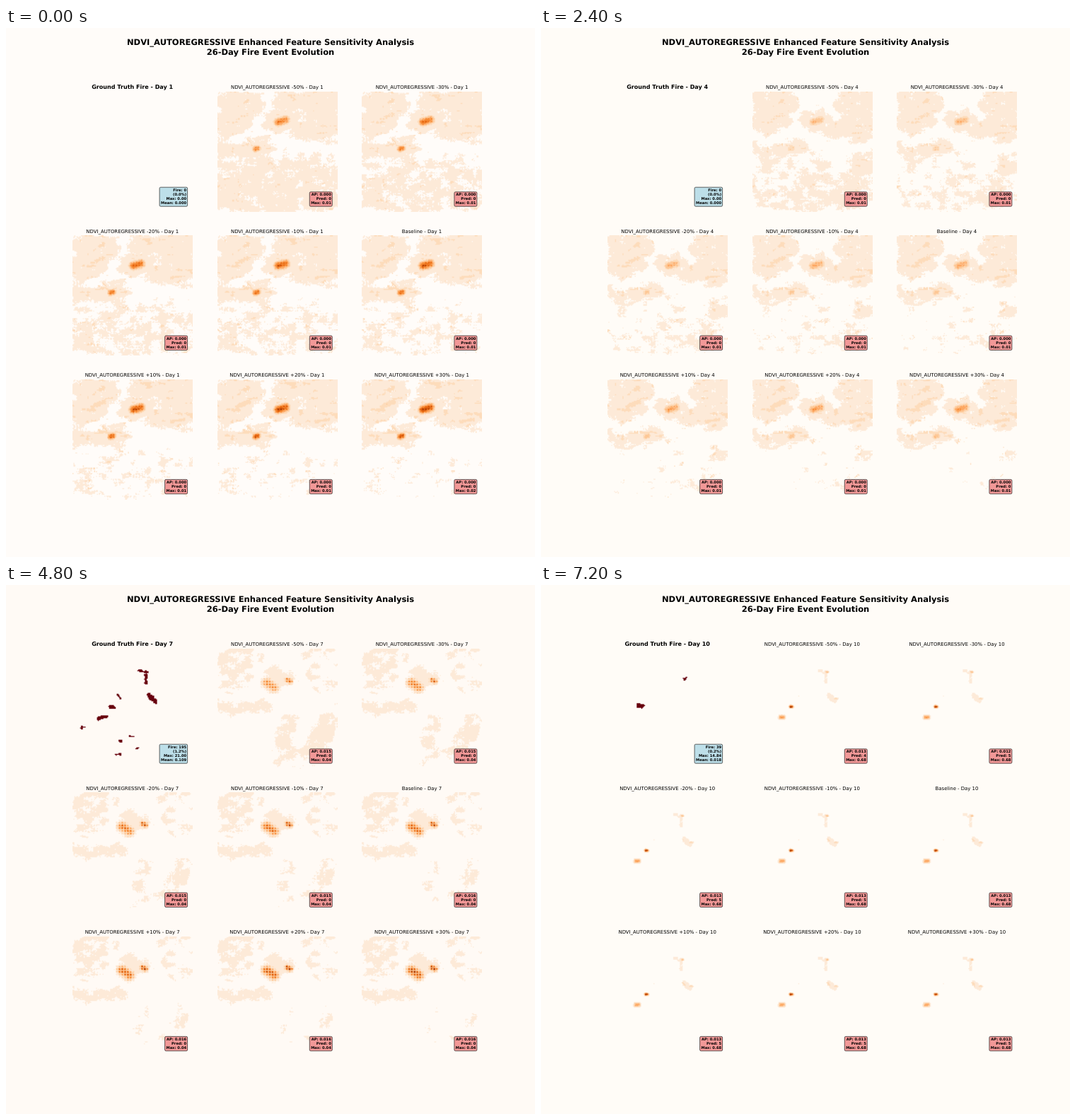
Recreate the animation shown at these times as an HTML page with a canvas. Size 748 by 748 pixels, loop 8 s.

```html
<!DOCTYPE html>
<html lang="en">
<head>
<meta charset="utf-8">
<title>Feature sensitivity</title>
<style>
html, body { margin: 0; width: 100%; height: 100%; overflow: hidden; background: #fffcf7; }
canvas, svg { position: absolute; left: 0; top: 0; width: 100%; height: 100%; display: block; }
text { font-family: "DejaVu Sans", sans-serif; fill: #000; text-rendering: geometricPrecision; }
.b { font-weight: bold; }
</style>
</head>
<body>
<canvas id="maps" width="748" height="748"></canvas>
<svg id="ui" viewBox="0 0 748 748"></svg>
<script>
const N = 128, SIZE = 170, STEP = 800, DAYS = 10;
const LEFT = 94, TOP = 90, DX = 204.65, DY = 203.3;
const SHIFTS = [-50, -30, -20, -10, 0, 10, 20, 30];
const COLORS = ['#fdead8', '#fddcbb', '#fdc795', '#fda863', '#f68932', '#e4640f', '#b13f03'];
const FIRE = '#67000d';

// Every shape is a capsule: x1, y1, x2, y2, radius, in panel units
const LAND = {
  nw: [[16, 16, 46, 14, 18], [14, 44, 34, 38, 17]],
  ne: [[138, 16, 156, 14, 20], [146, 36, 152, 46, 22]],
  crown: [[82, 40, 100, 42, 13]],
  link: [[90, 12, 118, 16, 13]],
  saddle: [[112, 52, 140, 54, 11]],
  ridge: [[36, 82, 66, 80, 9], [6, 82, 20, 84, 8]],
  spur: [[80, 86, 100, 82, 7]],
  plain: [[30, 132, 140, 132, 38]],
  column: [[100, 108, 98, 154, 9]],
  valley: [[162, 102, 126, 150, 11]]
};
const FADING = ['plain', 'column', 'valley'];
const HEAT = {
  core: [86, 43, 97, 40, 6.5], west: [54, 81, 57, 80, 5], nw: [28, 40, 44, 32, 7], ne: [140, 60, 158, 57, 4.5],
  cluster: [70, 48, 80, 55, 8], east: [99, 44, 103, 46, 4.5]
};
// Shoreline growth of each area, and strength of each hot spot
const weather = {
  1: { land: { nw: 3, ne: 4, crown: 4, link: 2, saddle: 2, ridge: 5, plain: -7, valley: -8 }, heat: { core: .82, west: .8, nw: .3, ne: .28 } },
  3: { land: { nw: 1, ne: 2, crown: 2, saddle: 4, ridge: 4, spur: 3, plain: -12, valley: -4 }, heat: { core: .62, west: .52, nw: .27, ne: .3 } },
  5: { land: { nw: 1, ne: 1, crown: 0, saddle: 0, ridge: 2, column: -3, valley: -2 }, heat: { core: .48, west: .38, nw: .34, ne: .27 } },
  6: { land: { nw: 1, ne: 2, link: 2, crown: 0, saddle: 5, ridge: 1, spur: 1, plain: -12, column: -2, valley: -2 }, heat: { core: .36, nw: .4, ne: .38 } },
  7: { land: { nw: -4, ne: -6, crown: -1, ridge: -2, column: -7, valley: -7 }, heat: { cluster: .6, east: .75 } }
};

const EMBERS = [
  [92, 31, 107, 33, 1.8], [104, 37, 104, 49, 1.8], [108, 66, 117, 74, 3], [53, 83, 57, 83, 2.4], [37, 99, 49, 96, 2.3], [64, 65, 68, 70, .9],
  [13, 112, 18, 111, 1.5], [81, 124, 86, 124, 1.5], [66, 131, 70, 131, 1.1], [89, 142, 93, 141, 1.4], [62, 150, 67, 149, 1.4]
];
const FRONTS = [
  [83, 27, 101, 34], [102, 36, 104, 50], [105, 52, 113, 75], [96, 80, 106, 84], [12, 109, 22, 107], [30, 108, 48, 100],
  [50, 98, 57, 85], [58, 94, 80, 82], [48, 142, 66, 141], [66, 140, 88, 125], [72, 156, 80, 156], [88, 143, 96, 143]
].map(c => [...c, 2.2]);
const grow = (list, by) => list.map(([a, b, c, d, r]) => [a, b, c, d, r + by]);
const STREAKS = [[92, 92, 78, 114, 9], [96, 124, 76, 150, 9]];
const fires = {
  5: { solid: [[93, 40, 93, 78, 9.5], [84, 31, 100, 34, 3], [19, 109, 26, 107, 2.4]], loose: [[74, 42, 72, 68, 7], [105, 48, 111, 80, 2], [106, 98, 108, 122, 1]], streaks: STREAKS },
  6: { solid: grow(EMBERS, .8), loose: FRONTS },
  7: { solid: EMBERS },
  8: { solid: grow(EMBERS.slice(0, 6), -1) },
  9: { solid: [[45, 81, 51, 81, 2], [107, 42, 110, 42, 1.5]] },
  10: { solid: [[44, 80, 49, 81, 3.2], [108, 42, 110, 43, 2]] }
};

const nth = (s, i) => {
  const a = s.split(' ');
  return a[Math.min(i, a.length - 1)];
};
const quiet = { fire: '0 0.0 0.00 0.000', ap: '0.000', pred: '0', max: '0.01' };
const stats = {
  1: { ...quiet, max: '0.01 0.01 0.01 0.01 0.01 0.01 0.01 0.02' },
  5: { ...quiet, fire: '1348 8.2 20.00 1.024', ap: '0.012 0.012 0.012 0.012 0.012 0.013' },
  6: { ...quiet, fire: '766 4.7 20.00 0.428', ap: '0.015 0.016' },
  7: { ...quiet, fire: '195 1.2 21.00 0.109', ap: '0.015 0.015 0.015 0.015 0.016', max: '0.04' },
  8: { ...quiet, fire: '37 0.2 21.00 0.017', ap: '0.014', max: '0.20 0.18 0.17 0.17 0.16 0.15 0.15 0.14' },
  9: { fire: '21 0.1 15.00 0.010', ap: '0.013', pred: '0', max: '0.35' },
  10: { fire: '39 0.2 14.84 0.018', ap: '0.013 0.012 0.013', pred: '4 5', max: '0.68' }
};
const ground = day => day === 7 ? '#fffaf5' : day < 3 ? '#fffcf9' : '#fffcf7';

function hash(x, y, k) {
  let h = Math.imul(x, 374761393) + Math.imul(y, 668265263) + Math.imul(k, 974711) | 0;
  h = Math.imul(h ^ h >>> 13, 1274126177);
  return ((h ^ h >>> 16) >>> 0) / 4294967296;
}
const mix = (a, b, t) => a + (b - a) * t;
const ease = t => t * t * (3 - 2 * t);
function smooth(x, y, k) {
  const i = Math.floor(x), j = Math.floor(y), u = ease(x - i), v = ease(y - j);
  return mix(mix(hash(i, j, k), hash(i + 1, j, k), u), mix(hash(i, j + 1, k), hash(i + 1, j + 1, k), u), v);
}
const field = f => Float32Array.from({ length: N * N }, (_, i) => f(i % N, i / N | 0, i));
const unit = v => (v + .5) * SIZE / N;
const ragged = k => field((x, y) => .55 * smooth(x / 8, y / 6, k) + .3 * smooth(x / 3, y / 2, k + 20)
  + .15 * hash(x, y, k + 40) - .5 + (x % 3 && y % 3 ? .03 : -.04));
const rough = ragged(1);
const specks = field((x, y) => .7 * smooth(x / 8, y / 4, 7) + .3 * smooth(x / 2, y / 1.5, 8));

function dist(x, y, [x1, y1, x2, y2]) {
  const dx = x2 - x1, dy = y2 - y1;
  const t = Math.max(0, Math.min(1, ((x - x1) * dx + (y - y1) * dy) / (dx * dx + dy * dy || 1)));
  return Math.hypot(x - x1 - t * dx, y - y1 - t * dy);
}
const depth = (x, y, list = []) => list.reduce((m, c) => Math.max(m, c[4] - dist(x, y, c)), -99);
const depths = {};
for (const k in LAND) depths[k] = field((x, y) => Math.min(5, depth(unit(x), unit(y), LAND[k])));

const heat = (spots, grid) => field((x, y) => {
  const h = spots.reduce((m, c) => Math.max(m, c[5] * Math.exp(-((dist(unit(x), unit(y), c) / c[4]) ** 2))), 0);
  return h * (x % 3 && y % 3 ? 1 + grid : 1 - grid);
});

function burn({ solid, loose, streaks }) {
  return field((x, y) => {
    const px = unit(x), py = unit(y), n = smooth(x / 3, y / 2, 11) - .5;
    const stripe = Math.sin((.57 * px + .82 * py) * .7) > .1;
    return +(depth(px, py, solid) + n * 3 > 0 || depth(px, py, loose) + n * 14 > 0
      || stripe && depth(px, py, streaks) + n * 16 > 0);
  });
}
const burnt = {};
for (const d in fires) burnt[d] = burn(fires[d]);

function blend(a, b, none) {
  const out = {};
  for (const k of Object.keys({ ...a, ...b })) out[k] = ((a[k] ?? none) + (b[k] ?? none)) / 2;
  return out;
}
weather[2] = weather[1];
weather[4] = { land: blend(weather[3].land, weather[5].land, -14), heat: blend(weather[3].heat, weather[5].heat, 0) };

const models = {};
for (const d in weather) {
  const { land, heat: h } = weather[d], seed = ragged(d === '2' ? 1 : +d);
  models[d] = {
    pale(i, s) {
      for (const k in land) {
        const fades = FADING.includes(k);
        if (depths[k][i] + land[k] + seed[i] * (fades ? 36 : 24) - (fades ? 18 * s : 0) > 0) return true;
      }
      return false;
    },
    hot: heat(Object.keys(h).map(k => [...HEAT[k], h[k]]), d === '7' ? .3 : .06),
    gain: .3, speck: d < 7 ? .76 : 2
  };
}

function soften(a) {
  const at = (x, y) => a[Math.max(0, Math.min(N - 1, y)) * N + Math.max(0, Math.min(N - 1, x))];
  return field((x, y) => {
    let s = 0;
    for (let k = 0; k < 25; k++) s += at(x + k % 5 - 2, y + (k / 5 | 0) - 2);
    return s / 25;
  });
}
// Late days glow where the fire was three days before
function trail(day, shape, spots, speck) {
  const glow = soften(burnt[day - 3]).map(shape);
  models[day] = { pale: i => glow[i] + rough[i] * .4 > .5, hot: heat(spots, .04), gain: -.1, speck };
}
const spot = (x, y, r, a) => [x - r / 2, y, x + r / 2, y, r, a];
trail(8, v => v * (1 - v) * 3.3, [[21, 109, 25, 107, 3, .9], spot(109, 141, 1.8, .6), spot(77, 94, 3, .35)], .7);
trail(9, v => v * 1.1, [spot(56, 87, 4, .5), spot(54, 95, 3, .45), spot(108, 56, 4, .35)], .7);
trail(10, v => v * 1.1, [spot(55, 82, 2, 1.1), spot(42, 97, 3.5, .6), spot(106, 33, 1.8, .5), spot(118, 71, 2.5, .32)], .8);

const rgb = c => [1, 3, 5].map(i => parseInt(c.slice(i, i + 2), 16));
const tones = COLORS.map(rgb), dark = rgb(FIRE);

function tile(pick) {
  const c = document.createElement('canvas');
  c.width = c.height = N;
  const g = c.getContext('2d'), img = g.createImageData(N, N);
  for (let i = 0; i < N * N; i++) {
    const tone = pick(i);
    if (tone) img.data.set([...tone, 255], i * 4);
  }
  g.putImageData(img, 0, 0);
  return c;
}
function forecast(m, s) {
  return tile(i => {
    const pale = m.pale(i, s);
    const base = pale ? specks[i] + s * .12 > m.speck ? .28 : .18 : 0;
    const v = Math.max(base, m.hot[i] * (1 + m.gain * s) * (1 + rough[i] * .5));
    return v > .125 && tones[Math.min(6, Math.floor(v * 8) - 1)];
  });
}
const tiles = Array.from({ length: DAYS }, (_, i) => [
  tile(c => burnt[i + 1] && burnt[i + 1][c] && dark),
  ...SHIFTS.map(s => forecast(models[i + 1], s / 100))
]);

const ui = document.getElementById('ui');
function add(tag, attrs, body = '') {
  const e = document.createElementNS('http://www.w3.org/2000/svg', tag);
  for (const k in attrs) e.setAttribute(k, attrs[k]);
  e.textContent = body;
  ui.append(e);
  return e;
}
const label = (x, y, size, anchor, bold, body = '') =>
  add('text', { x, y, 'font-size': size, 'text-anchor': anchor, class: bold ? 'b' : '' }, body);

label(374, 24, 11.52, 'middle', true, 'NDVI_AUTOREGRESSIVE Enhanced Feature Sensitivity Analysis');
label(374, 38, 11.52, 'middle', true, '26-Day Fire Event Evolution');

const panels = Array.from({ length: 9 }, (_, i) => {
  const x = i % 3 * DX, y = Math.floor(i / 3) * DY, s = SHIFTS[i - 1];
  const name = !i ? 'Ground Truth Fire' : s ? `NDVI_AUTOREGRESSIVE ${s > 0 ? '+' : ''}${s}%` : 'Baseline';
  const title = label(x + 178.7, y + 86.4, i ? 6.91 : 8.06, 'middle', !i);
  const w = i ? 32 : 39.5, h = i ? 20.4 : 27, rows = i ? 3 : 4;
  add('rect', { x: x + 256.6 - w, y: y + 252.2 - h, width: w, height: h, rx: 1.6,
    fill: i ? '#f29897' : '#bddfe9', stroke: '#222', 'stroke-width': .7 });
  const lines = Array.from({ length: rows }, (_, k) =>
    label(x + 255.1, y + 249.4 - (rows - 1 - k) * 6.1, 5.18, 'end', true));
  return { x, y, name, title, lines };
});

const g = document.getElementById('maps').getContext('2d');
function show(d) {
  const day = d + 1, st = stats[day] || quiet;
  const [n, pct, max, mean] = st.fire.split(' ');
  g.fillStyle = document.body.style.background = ground(day);
  g.fillRect(0, 0, 748, 748);
  panels.forEach((p, i) => {
    g.drawImage(tiles[d][i], LEFT + p.x, TOP + p.y, SIZE, SIZE);
    p.title.textContent = `${p.name} - Day ${day}`;
    const text = i
      ? [`AP: ${nth(st.ap, i - 1)}`, `Pred: ${nth(st.pred, i - 1)}`, `Max: ${nth(st.max, i - 1)}`]
      : [`Fire: ${n}`, `(${pct}%)`, `Max: ${max}`, `Mean: ${mean}`];
    p.lines.forEach((l, j) => { l.textContent = text[j]; });
  });
}

let shown = -1;
const start = performance.now();
function frame(now) {
  const d = Math.floor(Math.max(0, now - start) / STEP) % DAYS;
  if (d !== shown) show(shown = d);
  requestAnimationFrame(frame);
}
frame(start);
</script>
</body>
</html>
```
